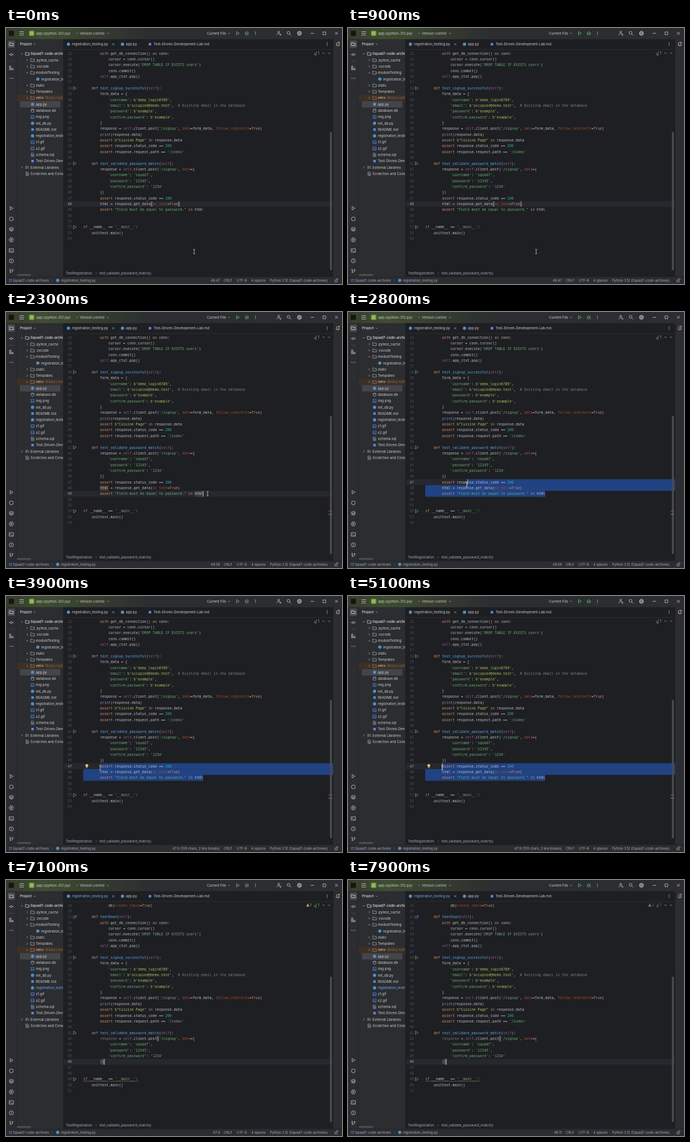
These frames come from a looping animation (600x458 px, 8 s). An HTML page with a canvas:

```html
<!DOCTYPE html>
<html lang="en">
<head>
<meta charset="utf-8">
<title>Code editor</title>
<style>
html, body { margin: 0; width: 100%; height: 100%; overflow: hidden; background: #1e1f22; }
canvas { display: block; width: 600px; height: 458px; }
</style>
</head>
<body>
<canvas id="stage" width="600" height="458"></canvas>
<script>
const c = document.getElementById('stage').getContext('2d');
const UI = 'Inter, "Noto Sans", sans-serif', MONO = '"DejaVu Sans Mono", monospace';
const LEFT = 137.9, COL = 3.757, ROW = 10.36, BOTTOM = 377, FIRST = 19;
const INK = '#ced0d6', DIM = '#a8adbd', PANEL = '#2b2d30', EDITOR = '#1e1f22';
const BLUE = '#4f8fc4', GREEN = '#5fad65', LINK = '#70aeff';
const PROJECT = 'Squad7-code-archives', FILE = 'registration_testing.py';

const source = `            db(create_table=True)

    def tearDown(self):
        with get_db_connection() as conn:
            cursor = conn.cursor()
            cursor.execute('DROP TABLE IF EXISTS users')
            conn.commit()
        self.app_ctxt.pop()

    def test_signup_successful(self):
        form_data = {
            'username': b'demo_login6789',
            'email': b'occupied@demo.test',  # Existing email in the database
            'password': b'example',
            'confirm-password': b'example',
        }
        response = self.client.post('/signup', data=form_data, follow_redirects=True)
        print(response.data)
        assert b"Cuisine Page" in response.data
        assert response.status_code == 200
        assert response.request.path == '/index'

    def test_validate_password_match(self):
        response = self.client.post('/signup', data={
            'username': 'squad7',
            'password': '12345',
            'confirm_password': '1234'
        })
        assert response.status_code == 200
        html = response.get_data(as_text=True)
        assert "Field must be equal to password." in html


if __name__ == '__main__':
    unittest.main()
`.split('\n');
const cut = (from, to, ...add) => [...source.slice(0, from - FIRST), ...add, ...source.slice(to + 1 - FIRST)];
const cleared = cut(47, 49, ''), joined = cut(47, 49);

// Each capture group of the token pattern has the colour at the same index.
const tokens = /(#.*)|(b'[^']*'|b"[^"]*")|('[^']*'|"[^"]*")|\b(def|with|as|assert|in|if|True)\b|\b(self)\b|\b(print)\b|((?<=def )\w+)|(\w+(?==\S))|\b(\d+)\b|[^\s'"#\w]+|\w+/g;
const colors = ['#7a7e85', '#a5c261', '#6aab73', '#cf8e6d', '#94558d', '#8888c6', '#56a8f5', '#aa4926', '#2aacb8'];

// Text is laid out large and scaled down to keep fractional advances.
function text(s, x, y, color = INK, size = 6.15, { font = UI, align = 'left', weight = 400 } = {}) {
  c.save();
  c.scale(.1, .1);
  c.font = `${weight} ${size * 10}px ${font}`;
  c.textAlign = align;
  c.fillStyle = color;
  c.fillText(s, x * 10, (y + 2.2) * 10);
  c.restore();
}
const mono = (s, x, y, color) => text(s, x, y, color, 6.24, { font: MONO });

function box(x, y, w, h, color, r = 0) {
  c.fillStyle = color;
  c.beginPath();
  c.roundRect(x, y, w, h, r);
  c.fill();
}

// Icon path drawn around its centre; filled when the width is zero.
function icon(d, x, y, color = DIM, width = .8) {
  c.save();
  c.translate(x, y);
  const p = new Path2D(d);
  c.lineWidth = width;
  c.strokeStyle = c.fillStyle = color;
  width ? c.stroke(p) : c.fill(p);
  c.restore();
}
const circle = r => `M${r} 0A${r} ${r} 0 1 1 ${-r} 0A${r} ${r} 0 1 1 ${r} 0Z`;
const square = r => `M${-r} ${-r}H${r}V${r}H${-r}Z`;
const dot = (x, y, r, color) => icon(circle(r), x, y, color, 0);
const dots = (x, y, dx, dy) => [-1, 0, 1].forEach(i => dot(x + i * dx, y + i * dy, .65, INK));

const DOWN = 'M-1.7-.8L0 .9L1.7-.8', UP = 'M-1.7 .8L0-.9L1.7 .8', RIGHT = 'M-.8-1.7L.9 0L-.8 1.7';
const CROSS = 'M-1.7-1.7L1.7 1.7M1.7-1.7L-1.7 1.7', PLAY = 'M-2.2-3L3 0L-2.2 3Z';
const FOLDER = 'M-3.3-2.6H-.8L.3-1.5H3.3V2.6H-3.3Z', PAGE = 'M-2.3-3H.8L2.3-1.4V3H-2.3Z';
const LINES = 'M-1.3-.4H1.3M-1.3 1.2H1.3', PICTURE = square(2.7) + 'M-2.7 1.8L-.5-.5L2.7 2.5';

const kinds = {
  folder: (x, y) => icon(FOLDER, x, y),
  root: (x, y) => { icon(FOLDER, x, y, INK); box(x + 1, y + 1, 2.2, 2.2, '#548af7'); },
  venv: (x, y) => icon(FOLDER, x, y, '#c77d55'),
  py: (x, y) => dot(x, y, 2.9, BLUE),
  md: (x, y) => icon(square(2.2), x, y, '#548af7', 0),
  db: (x, y) => icon('M-2.5-2C-2.5-3.3 2.5-3.3 2.5-2V2C2.5 3.3-2.5 3.3-2.5 2ZM-2.5-2C-2.5-.8 2.5-.8 2.5-2', x, y),
  img: (x, y) => icon(PICTURE, x, y, '#548af7'),
  gif: (x, y) => icon(PICTURE, x, y, '#548af7'),
  sql: (x, y) => icon(PAGE + LINES, x, y),
  lib: (x, y) => icon('M-2.6-2.7V2.7M-.6-2.7V2.7M1.1-2.5L2.8 2.6', x, y),
  notes: (x, y) => icon(PAGE + LINES, x, y)
};
// [indent, kind, label, chevron]
const tree = [
  [0, 'root', PROJECT, DOWN], [1, 'folder', '.pytest_cache', RIGHT], [1, 'folder', '.vscode', RIGHT],
  [1, 'folder', 'moduleTesting', DOWN], [2, 'py', FILE], [1, 'folder', 'static', RIGHT],
  [1, 'folder', 'Templates', RIGHT], [1, 'venv', 'venv', RIGHT], [1, 'py', 'app.py'],
  [1, 'db', 'database.db'], [1, 'img', 'img.png'], [1, 'py', 'init_db.py'], [1, 'md', 'README.md'],
  [1, 'py', FILE], [1, 'gif', 's1.gif'], [1, 'gif', 's2.gif'], [1, 'sql', 'schema.sql'],
  [1, 'md', 'Test-Driven-Development-Lab.md'], [0, 'lib', 'External Libraries', RIGHT],
  [0, 'notes', 'Scratches and Consoles']
];

function titleBar() {
  const g = c.createLinearGradient(0, 0, 260, 0);
  g.addColorStop(0, '#343b2d');
  g.addColorStop(.25, '#404d30');
  g.addColorStop(1, PANEL);
  box(0, 0, 600, 20, g);
  box(5, 5, 9, 9, '#15170f');
  icon('M-4-3H4M-4 0H4M-4 3H4', 28, 9.5, INK);
  box(41, 4.7, 9.6, 9.6, '#6f9e3d', 2);
  icon(square(1.8), 45.8, 9.5, '#dbe8c8');
  text('app.cpython-312.pyc', 54, 9.5);
  icon(DOWN, 127, 9.5);
  text('Version control', 132, 9.5);
  icon(DOWN, 182, 9.5);
  text('Current File', 359, 9.5);
  icon(DOWN, 398, 9.5);
  icon(PLAY, 413.8, 9.5, GREEN, 1);
  icon('M-1.8-1.2A1.8 1.8 0 0 1 1.8-1.2V1.2A1.8 1.8 0 0 1-1.8 1.2ZM-3.4-1.8L-1.8-.8M3.4-1.8L1.8-.8M-3.4 .4H3.4M-3.4 3L-1.8 1.6M3.4 3L1.8 1.6', 430, 9.5, GREEN);
  dots(445.5, 9.5, 0, 2.3);
  icon('M1.6-2A1.6 1.6 0 1 1-1.6-2A1.6 1.6 0 1 1 1.6-2M-3.3 3.5C-3.3-.2 2-.2 2.3 1.5M3 1V4.2M1.4 2.6H4.6', 487, 9.5, INK);
  icon('M1.6-.8A2.5 2.5 0 1 1-3.4-.8A2.5 2.5 0 1 1 1.6-.8M1 1L3.7 3.7', 505.5, 9.5, INK);
  icon(circle(1.3), 524, 9.5, INK);
  c.setLineDash([1.4, .9]);
  icon(circle(3.5), 524, 9.5, INK, 1.3);
  c.setLineDash([]);
  icon(circle(2.8), 524, 9.5, INK, .7);
  icon('M-3 0H3', 547, 9.5, INK);
  icon(square(2.5), 568.5, 9.5, INK);
  icon('M-2.5-2.5L2.5 2.5M2.5-2.5L-2.5 2.5', 590, 9.5, INK);
}

function sideBars() {
  box(0, 20, 18.5, 425, PANEL);
  box(584.5, 20, 15.5, 425, PANEL);
  box(3, 22.5, 13, 13, '#4a4c51', 2);
  icon(FOLDER, 9.5, 29, '#dfe1e5');
  icon(circle(1.8) + 'M-4.2 0H-1.8M1.8 0H4.2', 9.5, 47.5, INK);
  icon('M-3.5 0H3.5', 9.5, 59.5, '#4a4c51');
  [[-2, -2], [-2, 2], [2, 2]].forEach(([x, y]) => icon(square(1.3), 9.5 + x, 71.5 + y, INK));
  dots(9.5, 90, 2.8, 0);
  icon(PLAY, 9.5, 322.5, INK);
  icon(circle(3.4), 9.5, 341.5, INK);
  icon('M0-3.6L3.8-1.7L0 .2L-3.8-1.7ZM-3.8 0L0 1.9L3.8 0M-3.8 1.7L0 3.6L3.8 1.7', 9.5, 360, INK);
  icon('M-2-3.5H2L4 0L2 3.5H-2L-4 0ZM-1-1.6L1.7 0L-1 1.6Z', 9.5, 379, INK);
  icon('M-3.7-3.1H3.7V3.1H-3.7ZM-2.2-1.4L-.8 0L-2.2 1.4M.3 1.5H2.2', 9.5, 398, INK);
  icon(circle(3.6) + 'M0-2V.6M0 1.3V2.1', 9.5, 416.5, INK);
  icon('M-2-1.2V3.6M-2 1.5H.5C2 1.5 2.2 .6 2.2-.8M-1-2.4A1 1 0 1 1-3-2.4A1 1 0 1 1-1-2.4M3.2-2A1 1 0 1 1 1.2-2A1 1 0 1 1 3.2-2', 9.5, 435, INK);
  icon('M-3 2H3L2.2 .8V-1A2.2 2.2 0 0 0-2.2-1V.8ZM-.8 3.3H.8', 592.5, 29, INK);
  dot(595, 26, 1.4, '#db5c5c');
}

function projectPanel(changed) {
  c.save();
  c.beginPath();
  c.rect(19, 20, 83, 425);
  c.clip();
  box(19, 20, 83, 425, PANEL);
  text('Project', 25, 29, INK, 6.15, { weight: 600 });
  icon(DOWN, 51, 29);
  box(19, 119.7, 83, 11.3, '#3d3026');
  box(25, 131, 72, 11.3, '#43454a', 1.5);
  tree.forEach(([depth, kind, label, chevron], i) => {
    const y = 46.2 + i * 11.29, x = 38 + depth * 9.4;
    if (chevron) icon(chevron, x - 9.6, y);
    kinds[kind](x, y);
    text(label, x + 5.8, y, changed && i === 13 ? LINK : INK, 6.15, { weight: i ? 400 : 600 });
    if (kind === 'venv') text('library root', 70, y, '#7a7268');
  });
  box(19.5, 440, 25, 3.6, '#4a4b4e');
  c.restore();
}

function tabs(changed) {
  box(102.5, 20, 482, 18.5, EDITOR);
  kinds.py(111.5, 29);
  text(FILE, 118, 29, changed ? LINK : INK);
  icon(CROSS, 191.5, 29);
  kinds.py(208, 29);
  text('app.py', 214, 29);
  kinds.md(257, 29);
  text('Test-Driven-Development-Lab.md', 263.5, 29);
  dots(573.5, 29, 0, 2.3);
  box(102.5, 38, 482, .6, '#393b40');
}

function codeLine(line, n, y, unused) {
  for (const m of line.matchAll(tokens)) {
    const k = m.slice(1).findIndex(v => v !== undefined);
    const grey = unused && n === 42 && m[0] === 'response';
    mono(m[0], LEFT + m.index * COL, y, grey ? '#6f737a' : colors[k] || '#bcbec4');
  }
}

// Pointer path: [time, x, y]
const path = [[0, 336, 400], [1300, 336, 400], [1900, 360, 325], [2400, 360, 325], [2800, 212, 308.8], [3050, 168, 307]];
function pointer(t) {
  const i = path.findIndex(p => p[0] > t);
  if (i < 0) return path[path.length - 1].slice(1);
  const [a, b] = [path[i - 1], path[i]], k = (t - a[0]) / (b[0] - a[0]);
  return [1, 2].map(j => a[j] + (b[j] - a[j]) * k);
}

function caretAt(t, [mx, my]) {
  if (t < 2000) return [48, 46];
  if (t < 2400) return [49, 57];
  if (t < 5300) {
    const n = Math.round((my - BOTTOM) / ROW) + 54;
    const col = Math.round((mx - LEFT) / COL);
    return [n, Math.min(col, source[n - FIRST].length)];
  }
  if (t < 6000) return [47, 8];
  if (t < 6400) return [47, 4];
  return t < 6700 ? [47, 0] : [46, 10];
}

// The blink restarts whenever the caret moves.
const moves = [-700, 2000, 2600, 3050, 5300, 6000, 6400, 6700];
const caretOn = t => (t - moves.findLast(m => m <= t)) % 1000 < 500;

function editor(t, caret) {
  const lines = t < 5300 ? source : t < 6700 ? cleared : joined;
  const last = FIRST + lines.length - 1;
  const rowY = n => BOTTOM - (last - n) * ROW;
  const mark = (n, from, to, color) => box(LEFT + from * COL, rowY(n) - ROW / 2, (to - from) * COL, ROW, color);
  const [line, col] = caret, warned = t >= 5700;

  c.save();
  c.beginPath();
  c.rect(102.5, 38.6, 482, 394.4);
  c.clip();
  box(102.5, rowY(line) - ROW / 2, 482, ROW, '#26282e');
  if (t < 2000) [32, 45].forEach(i => mark(48, i, i + 1, '#484b50'));
  if (t >= 6700) { mark(42, 35, 36, '#484b50'); mark(46, 9, 10, '#484b50'); }
  const usages = t >= 2300 && t < 5300;
  if (usages) { mark(48, 8, 12, '#45322f'); mark(49, 53, 57, '#373f3d'); }
  if (t >= 2400 && t < 5300) {
    for (let n = line; n <= 49; n++) mark(n, n === line ? col : 0, n < 49 ? 119 : 57, '#214283');
  }
  lines.forEach((s, i) => {
    const n = FIRST + i, y = rowY(n);
    mono(n, 110, y, n === line ? '#a1a3ab' : '#4b5059');
    codeLine(s, n, y, warned);
    if (/^( {4}def test_|if )/.test(s)) icon(PLAY, 122.5, y, GREEN);
    if (s.includes('tearDown')) {
      icon(circle(2.2), 121.8, y + .4, '#548af7');
      icon('M0 2V-2M-1.3-.7L0-2L1.3-.7', 125, y - 1, '#548af7');
    }
    if (warned && s.startsWith('if')) {
      icon('M0 0' + 'l1 -.9l1 .9'.repeat(49), LEFT, y + 4.2, '#8b8a62', .6);
    }
  });
  if (caretOn(t)) box(LEFT + col * COL - .2, rowY(line) - ROW / 2, .9, ROW, INK);
  if (t >= 3600 && t < 5300) {
    dot(144.3, 303.3, 2.5, '#f2c55c');
    box(143.2, 305.7, 2.2, 2.1, '#a8adbd');
  }
  c.restore();

  const busy = t >= 7200, tint = color => busy ? '#6f737a' : color;
  if (warned) {
    icon('M0-2.9L3.1 2.5H-3.1Z', 539, 45, tint('#c29e4a'), 0);
    text(busy ? 2 : 1, 543, 45, tint(DIM));
  }
  icon('M-2.4-.4L-.6 1.5L2.6-2.6M-2.4 3H2.4', 552.8, 45, tint(GREEN), 1);
  text(1, 557, 45, tint(DIM));
  icon(UP, 567, 45);
  icon(DOWN, 577, 45);
  const top = 173 + (last - 51) * 4.4;
  box(578.4, top, 3.6, 433 - top, '#4a4b4e');
  if (usages) { box(576, 355.5, 6.5, 1.1, '#a34f58'); box(576, 361.3, 6.5, 1.1, '#6a8670'); }
}

function footer(t) {
  if (t < 6000 || t >= 6700) {
    text('TestRegistration', 107, 439, DIM);
    icon(RIGHT, 161, 439, '#6f737a', .6);
    text('test_validate_password_match()', 167, 439, DIM);
  }
  box(0, 445, 600, 13, PANEL);
  box(0, 445, 600, .6, EDITOR);
  const label = (s, x, align) => text(s, x, 451.5, DIM, 5.95, { align });
  icon(square(1.9), 8, 451.5, '#548af7');
  label(PROJECT, 12, 'left');
  icon(RIGHT, 82.5, 451.5, '#6f737a', .6);
  kinds.py(92.3, 451.5);
  label(FILE, 98, 'left');
  const place = t < 2300 ? '48:47' : t < 3300 ? '49:58'
    : t < 5500 ? '47:9 (139 chars, 2 line breaks)' : t < 7200 ? '47:9' : '46:11';
  label(place, 382, 'right');
  label('CRLF', 389, 'left');
  label('UTF-8', 412, 'left');
  label('4 spaces', 438, 'left');
  label(`Python 3.12 (${PROJECT})`, 471.5, 'left');
  icon('M-2.7-.4H1.4V3H-2.7ZM.3-.4V-1.7A1.4 1.4 0 0 1 3.1-1.7V-1', 590, 451.2);
}

function draw() {
  const t = performance.now() % 8000, mouse = pointer(t), changed = t >= 5700;
  box(0, 0, 600, 458, EDITOR);
  titleBar();
  sideBars();
  projectPanel(changed);
  tabs(changed);
  editor(t, caretAt(t, mouse));
  footer(t);
  if (t < 5300) icon('M-1.8-4H-.5L0-3.5L.5-4H1.8M0-3.5V3.5M-1.8 4H-.5L0 3.5L.5 4H1.8', ...mouse, '#d5d6d8');
  requestAnimationFrame(draw);
}
draw();
</script>
</body>
</html>
```
